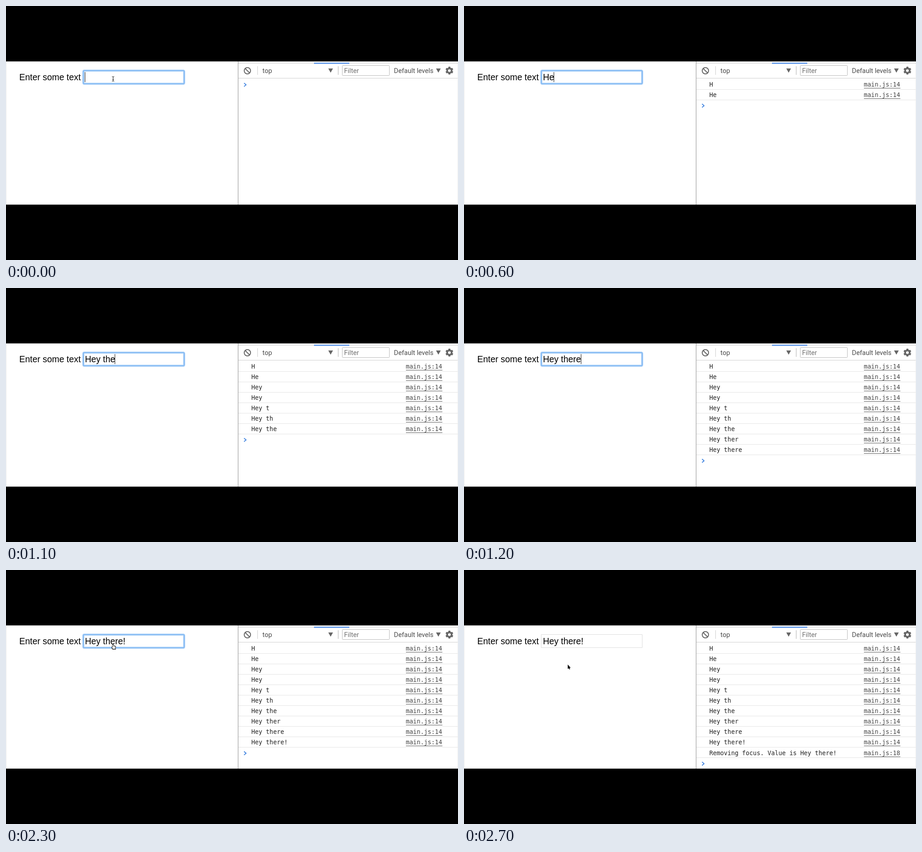
Write an HTML page with a canvas that moves like this. It is 998 by 561 pixels and loops after 3 s.

```html
<!DOCTYPE html>
<html lang="en">
<head>
<meta charset="utf-8">
<title>Input events</title>
<style>
  html, body { margin: 0; width: 100%; height: 100%; overflow: hidden; background: #000; }
  canvas { display: block; width: 998px; height: 561px; }
</style>
</head>
<body>
<canvas id="stage" width="998" height="561"></canvas>
<script>
const ctx = document.getElementById('stage').getContext('2d');
const LOOP = 3000, STEP = 100;
const TYPE_START = 200, SPEED_UP = 800, LAST_KEY = 1600;
const CARET_OFF = 2000, MOVE = 2300, BLUR = 2600, BLUR_LOG = 2700;
const PHRASE = 'Hey there!';
const SANS = '19.4px "Liberation Sans", Arial, sans-serif';
const UI = '14.6px Roboto, sans-serif';
const MONO = '13.35px "DejaVu Sans Mono", monospace';
const ROW = 23.07;
const GREY = '#666', INK = '#222';

const clamp = v => Math.min(1, Math.max(0, v));
const mix = (a, b, k) => a + (b - a) * k;

// Slow steady keys at first, then an accelerating burst, then the "!"
function typedCount(t) {
  if (t < TYPE_START) return 0;
  if (t < SPEED_UP) return 1 + Math.floor((t - TYPE_START) / 250);
  if (t < LAST_KEY) return 4 + Math.floor(5 * clamp((t - SPEED_UP) / 400) ** 1.7);
  return PHRASE.length;
}

function rect(x, y, w, h, color) {
  ctx.fillStyle = color;
  ctx.fillRect(x, y, w, h);
}

function text(str, x, y, font, color) {
  ctx.font = font;
  ctx.fillStyle = color;
  ctx.fillText(str, x, y);
}

function line(color, width, ...points) {
  ctx.beginPath();
  points.forEach(([x, y]) => ctx.lineTo(x, y));
  ctx.strokeStyle = color;
  ctx.lineWidth = width;
  ctx.stroke();
}

function shape(color, ...points) {
  ctx.beginPath();
  points.forEach(([x, y]) => ctx.lineTo(x, y));
  ctx.closePath();
  ctx.fillStyle = color;
  ctx.fill();
}

function disc(x, y, r, color) {
  ctx.beginPath();
  ctx.arc(x, y, r, 0, Math.PI * 2);
  ctx.fillStyle = color;
  ctx.fill();
}

function box(x, y, w, h, r, color, width) {
  ctx.beginPath();
  ctx.roundRect(x, y, w, h, r);
  ctx.strokeStyle = color;
  ctx.lineWidth = width;
  ctx.stroke();
}

const dropdown = x => shape(GREY, [x - 5.2, 138], [x + 5.2, 138], [x, 147.2]);

function clearIcon(x, y) {
  box(x - 7, y - 7, 14, 14, 7, GREY, 2);
  line(GREY, 2, [x - 5, y - 5], [x + 5, y + 5]);
}

function gear(x, y) {
  ctx.save();
  ctx.translate(x, y);
  disc(0, 0, 6.5, GREY);
  for (let i = 0; i < 6; i++) {
    shape(GREY, [-3, -5], [-1.9, -8.6], [1.9, -8.6], [3, -5]);
    ctx.rotate(Math.PI / 3);
  }
  disc(0, 0, 3, '#fff');
  ctx.restore();
}

function toolbar() {
  rect(513, 122, 485, 4, '#fafafa');
  rect(513, 126, 485, 1, '#d2d2d2');
  rect(680, 125.4, 78, 2.2, '#4285e8');
  rect(513, 159, 485, 1, '#cfcfcf');
  clearIcon(533, 143);
  rect(555, 133, 1, 19, '#ccc');
  text('top', 566.3, 148, UI, '#4c4c4c');
  dropdown(716.8);
  rect(733, 133, 1, 19, '#b0b0b0');
  box(742.5, 131.5, 104, 22, 1, '#b8b8b8', 1);
  text('Filter', 746.5, 148, UI, '#707070');
  text('Default levels', 856.6, 148, UI, '#4c4c4c');
  dropdown(954.7);
  gear(979, 142.7);
}

function logRow(i, message, link) {
  const y = Math.round(177.8 + i * ROW);
  text(message, 541.7, y, MONO, INK);
  text(link, 882.8, y, MONO, '#444');
  rect(883, y + 3, 80.5, 1, '#555');
  rect(513, Math.round(183.7 + i * ROW), 485, 1, '#e4e4e4');
}

function consolePane(t) {
  let rows = typedCount(t);
  for (let i = 0; i < rows; i++) logRow(i, PHRASE.slice(0, i + 1), 'main.js:14');
  if (t >= BLUR_LOG) logRow(rows++, 'Removing focus. Value is ' + PHRASE, 'main.js:18');
  const y = 174 + rows * ROW;
  line('#4285e0', 1.9, [525.6, y - 3.9], [530, y], [525.6, y + 3.9]);
}

function field(t) {
  text('Enter some text', 29.3, 164, SANS, '#000');
  if (t < BLUR) {
    box(170.8, 142.8, 222.6, 29, 2, 'rgba(120,180,245,.4)', 5);
    box(170.8, 142.8, 222.6, 29, 2, '#86bbf3', 2.6);
  } else {
    box(170.5, 142.5, 223, 29, 0, '#dcdcdc', 1);
  }
  const value = PHRASE.slice(0, typedCount(t));
  text(value, 174.2, 164, SANS, '#000');
  if (t < CARET_OFF) {
    rect(Math.round(173.6 + ctx.measureText(value).width), 146, 1, 22, '#111');
  }
}

function beam() {
  line(INK, 1.1, [0, -5], [0, 5]);
  for (const y of [-5, 5]) line(INK, 1, [-2.5, y * 1.1], [0, y * 0.9], [2.5, y * 1.1]);
  line(INK, 1, [-1.5, 1.5], [1.5, 1.5]);
}

function hand() {
  // Outline first, then a smaller white fill on top
  for (const [grow, color] of [[0.6, INK], [-0.5, '#fff']]) {
    const part = (x, y, w, h) => {
      ctx.beginPath();
      ctx.roundRect(x - grow, y - grow, w + 2 * grow, h + 2 * grow, 1.5);
      ctx.fillStyle = color;
      ctx.fill();
    };
    part(-1, 0.5, 2.6, 9);
    part(-2.2, 6.2, 3, 3.6);
    part(-0.6, 4.4, 6.4, 7.4);
  }
  for (const x of [2, 4]) line('#555', 0.7, [x, 8], [x, 10.5]);
}

function arrow() {
  line('#111', 1.8, [2.2, 5], [4.4, 10.6]);
  shape('#111', [0, 0], [0, 9.6], [6.4, 7]);
}

function pointer(t) {
  if (t >= TYPE_START && t < MOVE) return;
  const k = 1 - (1 - clamp((t - MOVE) / (BLUR - MOVE))) ** 2;
  ctx.save();
  if (t < TYPE_START) {
    ctx.translate(236.5, 161);
    beam();
  } else {
    ctx.translate(mix(236, 229, k), mix(163.5, 208.7, k));
    (k ? arrow : hand)();
  }
  ctx.restore();
}

function draw(t) {
  rect(0, 0, 998, 561, '#fff');
  rect(0, 122, 1, 317, '#ececec');
  toolbar();
  consolePane(t);
  rect(512, 122, 1, 317, '#8c8c8c');
  rect(997, 127, 1, 312, '#eee');
  field(t);
  pointer(t);
  rect(0, 0, 998, 122.4, '#000');
  rect(0, 438.7, 998, 123, '#000');
}

const start = performance.now();
function tick() {
  const t = (performance.now() - start) % LOOP;
  draw(Math.floor(t / STEP) * STEP);
  requestAnimationFrame(tick);
}
draw(0);
requestAnimationFrame(tick);
</script>
</body>
</html>
```
